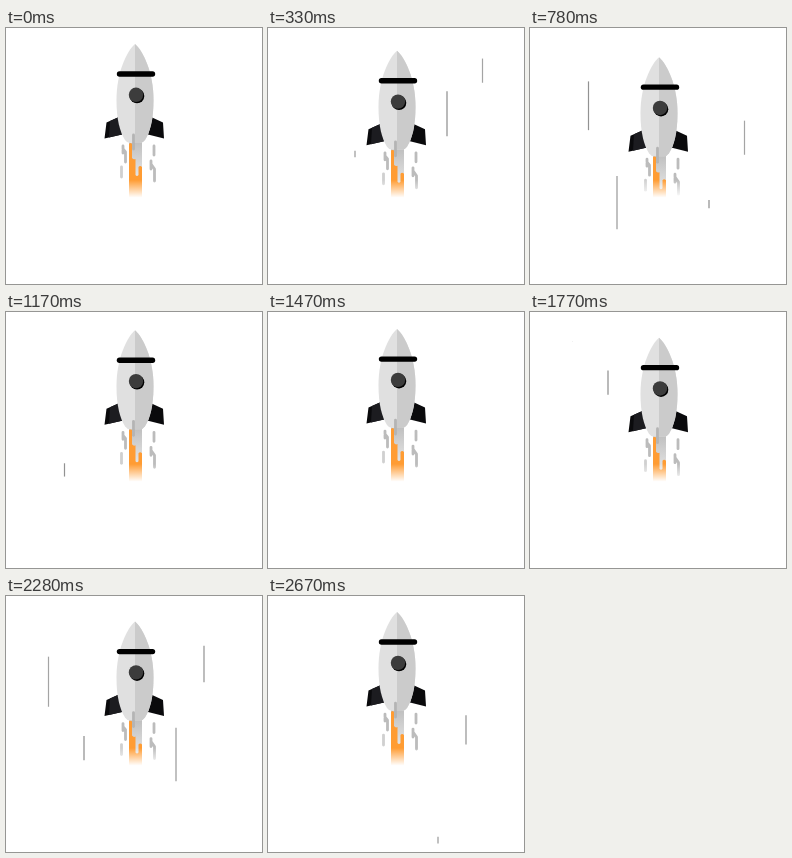
An HTML page for the animation above (2700 ms loop, 256x256 px).

```html
<!DOCTYPE html>
<html lang="en">
<head>
<meta charset="utf-8">
<title>Rocket</title>
<style>
  html, body { margin: 0; height: 100%; overflow: hidden; background: #fff; }
  svg { display: block; width: 100vw; height: 100vh; }
  .puffs { fill: none; stroke-linecap: round; stroke-linejoin: round; stroke-width: 2.8; }
</style>
</head>
<body>
<svg viewBox="0 0 256 256">
  <defs>
    <linearGradient id="haze" x2="0" y2="1">
      <stop offset="0" stop-color="#fff" stop-opacity="0"/>
      <stop offset=".8" stop-color="#fff"/>
    </linearGradient>
    <linearGradient id="exhaust" x2="0" y2="1">
      <stop offset="0" stop-color="#bdbdbd"/>
      <stop offset=".7" stop-color="#ececec"/>
    </linearGradient>
    <clipPath id="rightHalf"><path d="M129 0h40v130h-40z"/></clipPath>
    <path id="hull" d="M129 16C121 23 110.500 44 110.500 72C110.500 92 114 104 119 112Q121 115 124 115H134Q137 115 139 112C144 104 147.500 92 147.500 72C147.500 44 137 23 129 16Z"/>
  </defs>
  <g id="streaks"></g>
  <g id="rocket">
    <path fill="url(#exhaust)" d="M123 112h13v62h-13z"/>
    <path fill="#ff9c33" d="M123 116q1.500-2 3 0v14q1.500 2 3.500 1v16q1.500 2 3 0v-8q1.500-2 3.500 0v36H123z"/>
    <path class="puffs" stroke="#bcbcbc" d="M117 118v7M117 121l2.500 3v10M148 118v9M145 133v8M145 136l3.500 5v12"/>
    <path class="puffs" stroke="#d0d0d0" d="M115.500 139v10"/>
    <path fill="#0a0a0c" d="M114 88.500L100.500 94.500L98.500 110.500L116 106.500zM144 88.500L157 94.500L158 110.500L142 106.500z"/>
    <path fill="#1c1c20" d="M114 88.500L104 93L103 109.500L116 106.500z"/>
    <use href="#hull" fill="#e0e0e0"/>
    <use href="#hull" fill="#cbcbcb" clip-path="url(#rightHalf)"/>
    <path stroke="#000" stroke-width="5.400" stroke-linecap="round" d="M113.500 46H146.500"/>
    <circle cx="131" cy="68" r="7.300" fill="#000"/>
    <circle cx="130" cy="66.800" r="7.200" fill="#3c3c3c"/>
    <path class="puffs" stroke="#b4b4b4" d="M127.500 107v14"/>
  </g>
  <path fill="url(#haze)" d="M95 152h70v22H95z"/>
  <path fill="#fff" d="M105 173h55v20h-55z"/>
</svg>
<script>
const LOOP = 2700, STREAK_TIME = 800, STREAK_RANGE = 128, SECOND_WAVE = 1600;
const rocket = document.getElementById('rocket');
const layer = document.getElementById('streaks');

// x, top, start time, colour, and x in the second wave
const streaks = [
  [179, 57, 10, '#8c8c8c', 78],
  [214.500, 29, 170, '#a4a4a4', 42.500],
  [87, 122.600, 290, '#989898', 170],
  [58.500, 46, 430, '#929292', 198]
].flatMap(([x, top, start, color, x2]) => [
  { x, top, start, color },
  { x: x2, top, start: start + SECOND_WAVE, color }
]);

for (const s of streaks) {
  s.line = document.createElementNS('http://www.w3.org/2000/svg', 'path');
  s.line.setAttribute('stroke', s.color);
  s.line.setAttribute('stroke-width', 1.2);
  layer.append(s.line);
}

function draw(t) {
  const bob = 7 - 7 * Math.cos(4 * Math.PI * t / LOOP);
  rocket.setAttribute('transform', `translate(0 ${bob})`);
  for (const { x, top, start, line } of streaks) {
    const head = (t - start) / STREAK_TIME;
    const tail = Math.max(0.3 * head * head, 2 * head - 1.03);
    const visible = head > 0 && head < 1;
    line.setAttribute('d', visible
      ? `M${x} ${top + tail * STREAK_RANGE}V${top + head * STREAK_RANGE}` : '');
  }
}

const begin = performance.now();
function tick() {
  draw((performance.now() - begin) % LOOP);
  requestAnimationFrame(tick);
}
tick();
</script>
</body>
</html>
```
